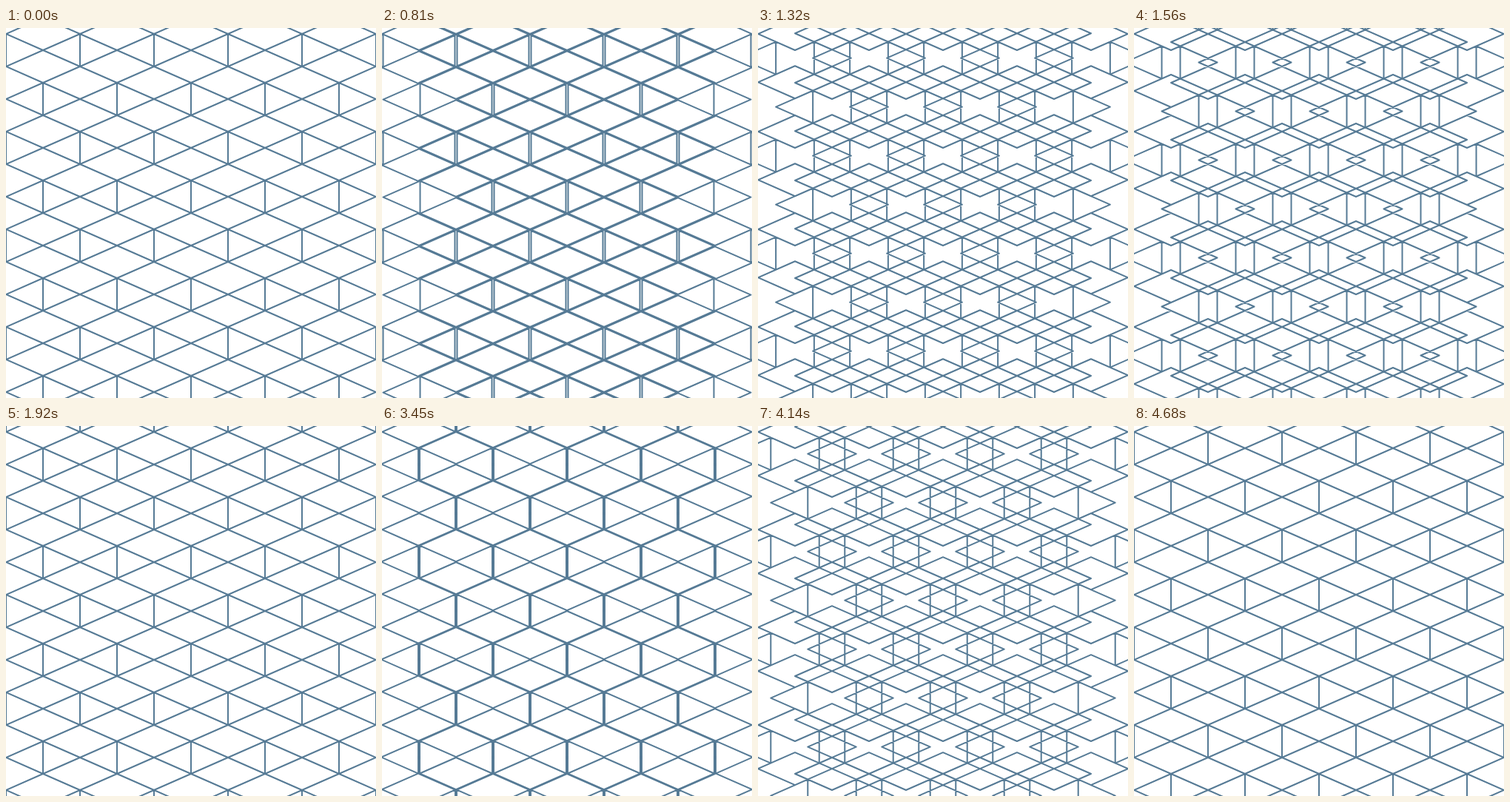
Recreate the animation shown at these times as an HTML page. Size 500x500 px, loop 5370 ms.

```html
<!DOCTYPE html>
<html lang="en">
<head>
<meta charset="utf-8">
<title>Sliding triangles and rhombi</title>
<style>
  html, body { margin: 0; width: 100%; height: 100%; overflow: hidden; background: #fff; }
  svg { display: block; width: 100%; height: 100%; }
  path { fill: none; stroke: #557a95; stroke-width: 2; stroke-linejoin: round; }
</style>
</head>
<body>
<svg viewBox="0 0 500 500"><path id="tiles"/></svg>
<script>
const LOOP = 5370, STEP = 30;
const W = 50, H = 22;           // half width and half height of a rhombus
const START = 660, SPAN = 1350; // sliding phase
const SNAP = 1920;              // tiles lock into the second pattern here
const tiles = document.getElementById('tiles');

const poly = pts => 'M' + pts.map(p => p.map(v => v.toFixed(2)).join(' ')).join('L') + 'Z';
const rhombus = (x, y) => poly([[x, y - H], [x + W, y], [x, y + H], [x - W, y]]);
const triangle = (x, y, dir) => poly([[x, y - H], [x + dir * W, y], [x, y + H]]);

function slide(time) {
  const t = Math.min(time, LOOP - STEP - time); // the way back mirrors the way out
  if (t <= START) return 0;
  if (t >= SNAP) return 1;
  return (1 - Math.cos(Math.PI * (t - START) / SPAN)) / 2;
}

function cell(x, y, s) {
  const dx = W * (1 - s), ty = y + H * s;
  return rhombus(x, y - H)
    + rhombus(x, y + H + 2 * H * s)
    + triangle(x - dx, ty, -1)
    + triangle(x + dx, ty, 1);
}

function picture(s) {
  let d = '';
  for (let row = -3; row < 9; row++) {
    const y = 30 + 3 * H * row;
    const odd = row & 1;
    for (let x = odd ? 100 : 50; x <= (odd ? 400 : 450); x += 100) d += cell(x, y, s);
    // outer uprights close the locked pattern
    if (odd && s === 1) for (const x of [0, 500]) d += `M${x} ${y}v${2 * H}`;
  }
  return d;
}

let shown = -1;
function draw(now) {
  const time = Math.floor(((now + 0.5) % LOOP) / STEP) * STEP;
  const s = slide(time);
  if (s !== shown) {
    tiles.setAttribute('d', picture(s));
    shown = s;
  }
}

const origin = performance.now();
function tick() {
  draw(Math.max(0, performance.now() - origin));
  requestAnimationFrame(tick);
}
tick();
</script>
</body>
</html>
```
